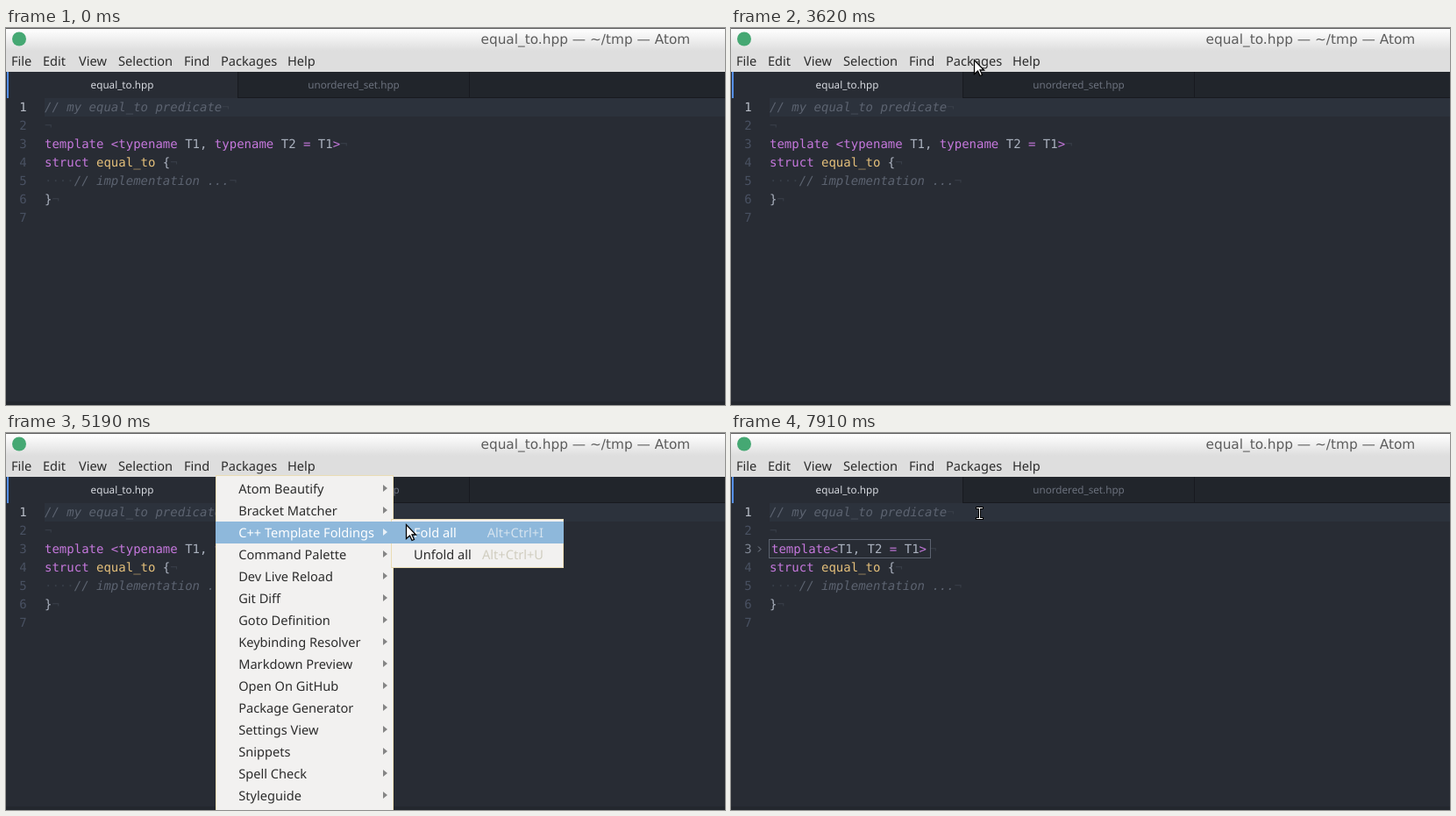
An HTML page with a canvas that plays this animation: 820x430 px, repeating every 8 s.

```html
<!DOCTYPE html>
<html lang="en">
<head>
<meta charset="utf-8">
<title>Template folding</title>
<style>
  html, body { margin: 0; width: 100%; height: 100%; overflow: hidden; background: #282c34; }
  canvas { display: block; }
</style>
</head>
<body>
<canvas id="stage" width="820" height="430"></canvas>
<script>
const ctx = document.getElementById('stage').getContext('2d');
ctx.textRendering = 'geometricPrecision';

const LOOP = 8000;
const UI = '14.6px "Noto Sans", "Open Sans", sans-serif';
const TAB = '11.7px "Noto Sans", "Open Sans", sans-serif';
const TITLE = '15.33px "DejaVu Sans", sans-serif';
const CODE = '14px "DejaVu Sans Mono", monospace';
const CHAR = 8.428, CODE_X = 44, ROW = 21;

const PURPLE = '#c678dd', PLAIN = '#abb2bf', YELLOW = '#e5c07b';
const COMMENT = '#5c6370', FAINT = '#383e48', BLUE = '#5691e8';
const MENU_BG = '#f2f1f0', MENU_HOVER = '#8eb8db', MENU_TEXT = '#2c2c2c', MENU_EDGE = '#eadcb4';

const menuBar = [['File', 6], ['Edit', 42], ['View', 83], ['Selection', 128],
  ['Find', 203], ['Packages', 245], ['Help', 321]];
const packages = ['Atom Beautify', 'Bracket Matcher', 'C++ Template Foldings', 'Command Palette',
  'Dev Live Reload', 'Git Diff', 'Goto Definition', 'Keybinding Resolver', 'Markdown Preview',
  'Open On GitHub', 'Package Generator', 'Settings View', 'Snippets', 'Spell Check', 'Styleguide'];
const actions = [['Fold all', 'Alt+Ctrl+I'], ['Unfold all', 'Alt+Ctrl+U']];

const header = [['template <typename', PURPLE], [' T1, ', PLAIN], ['typename', PURPLE],
  [' T2 ', PLAIN], ['=', PURPLE], [' T1', PLAIN], ['>', PURPLE]];
const foldedHeader = [['template<', PURPLE], ['T1, T2 ', PLAIN], ['=', PURPLE],
  [' T1', PLAIN], ['>', PURPLE]];
const EOL = ['¬', FAINT];

const MENU_OPEN = 3750, SUBMENU_OPEN = 4650, MENU_CLOSE = 5850, FOLD = 5890;
const blinks = [80, 480, 880, 1280, 1680, 2070, 2460, 2860, 3260, 3620, 5850, 6330, 6730, 7120, 7520, 7910];

// Pointer path: time, x, y
const path = [[3020, 505, 78], [3140, 360, 52], [3260, 277, 36], [3970, 277, 36], [4130, 288, 75],
  [4250, 297, 97], [4370, 302, 107], [4830, 302, 107], [5010, 400, 108], [5190, 463, 104],
  [5930, 463, 104], [6250, 368, 98], [6620, 284, 91], [6660, 283, 91]];

function rect(x, y, w, h, color) {
  ctx.fillStyle = color;
  ctx.fillRect(x, y, w, h);
}

function text(str, x, y, font, color, align = 'left') {
  ctx.font = font;
  ctx.fillStyle = color;
  ctx.textAlign = align;
  ctx.fillText(str, x, y);
}

function polygon(points, fill, stroke) {
  ctx.beginPath();
  points.forEach(([x, y]) => ctx.lineTo(x, y));
  ctx.closePath();
  ctx.fillStyle = fill;
  ctx.fill();
  if (stroke) {
    ctx.strokeStyle = stroke;
    ctx.lineWidth = 1.3;
    ctx.stroke();
  }
}

function code(line, segments, x = CODE_X) {
  for (const [str, color] of segments) {
    const font = color === COMMENT ? 'italic ' + CODE : CODE;
    text(str, x, 74 + line * ROW, font, color);
    x += str.length * CHAR;
  }
}

function drawWindow() {
  const shade = ctx.createLinearGradient(0, 1, 0, 26);
  shade.addColorStop(0, '#ffffff');
  shade.addColorStop(1, '#dedede');
  rect(0, 0, 820, 50, '#dedede');
  rect(0, 1, 820, 25, shade);
  rect(0, 0, 820, 1, '#5c5c5c');
  ctx.beginPath();
  ctx.arc(15, 12.5, 8, 0, 2 * Math.PI);
  ctx.fillStyle = '#45a873';
  ctx.fill();
  text('equal_to.hpp — ~/tmp — Atom', 541.5, 18, TITLE, '#5c5c5c');
  for (const [label, x] of menuBar) text(label, x, 43, UI, MENU_TEXT);

  rect(0, 50, 820, 30, '#21252b');
  rect(264, 79, 556, 1, '#181a1f');
  rect(0, 50, 264, 30, '#282c34');
  rect(264, 50, 1, 30, '#181a1f');
  rect(528, 50, 1, 30, '#181a1f');
  rect(1, 50, 2, 30, BLUE);
  text('equal_to.hpp', 132.5, 69, TAB, '#d7dae0', 'center');
  text('unordered_set.hpp', 396.5, 69, TAB, '#6b717d', 'center');
}

function drawEditor(t) {
  const folded = t >= FOLD;
  rect(0, 80, 820, 350, '#282c34');
  rect(44, 80, 776, ROW, '#2c323c');
  rect(0, 426, 820, 4, '#23272e');
  for (let n = 1; n <= 7; n++) {
    const color = n === 1 ? '#b9bec8' : n === 3 && folded ? '#7f8694' : '#495162';
    text(n, 15.3, 74 + n * ROW, CODE, color);
  }
  code(1, [['// my equal_to predicate', COMMENT], EOL]);
  code(2, [EOL]);
  if (folded) {
    code(3, foldedHeader, 46);
    code(3, [EOL], 226);
    ctx.strokeStyle = '#5c6370';
    ctx.lineWidth = 1;
    ctx.strokeRect(43.5, 121.5, 184, 21);
    ctx.strokeStyle = '#7f8694';
    ctx.beginPath();
    ctx.moveTo(31, 129.5);
    ctx.lineTo(34, 132.5);
    ctx.lineTo(31, 135.5);
    ctx.stroke();
  } else {
    code(3, [...header, EOL]);
  }
  code(4, [['struct ', PURPLE], ['equal_to', YELLOW], [' {', PLAIN], EOL]);
  code(5, [['····', FAINT], ['// implementation ...', COMMENT], EOL]);
  code(6, [['}', PLAIN], EOL]);

  const caretOn = blinks.filter(b => b <= t).length % 2 === 1;
  if (caretOn) rect(246, 80, 2, ROW, BLUE);
}

function panel(x, y, w, h) {
  rect(x, y, w, h, MENU_EDGE);
  rect(x + 1, y + 1, w - 2, h - 2, MENU_BG);
}

function drawMenus(t, pointer) {
  if (t < MENU_OPEN || t >= MENU_CLOSE) return;
  const hovered = Math.min(2, Math.floor((pointer.y - 51) / 25));
  panel(239, 48, 203, 390);
  packages.forEach((label, i) => {
    const y = 51 + i * 25, active = i === hovered;
    if (active) rect(239, y, 203, 25, MENU_HOVER);
    text(label, 265.2, y + 18, UI, active ? '#ffffff' : MENU_TEXT);
    polygon([[430, y + 8], [435, y + 12], [430, y + 16]], active ? '#e8f0f7' : '#858585');
  });

  if (t < SUBMENU_OPEN) return;
  panel(439, 98, 197, 56);
  actions.forEach(([label, keys], i) => {
    const y = 101 + i * 25, active = i === 0 && pointer.x >= 440;
    if (active) rect(439, y, 197, 25, MENU_HOVER);
    text(label, 465, y + 18, UI, active ? '#ffffff' : MENU_TEXT);
    text(keys, 613, y + 18, UI, active ? '#d5e3ef' : '#d0cdbf', 'right');
  });
}

function pointerAt(t) {
  const tick = Math.floor((t - 10) / 40) * 40 + 10;
  const time = Math.max(tick, path[0][0]);
  const next = path.findIndex(p => p[0] > time);
  if (next < 0) {
    const [, x, y] = path[path.length - 1];
    return { x, y };
  }
  const [t0, x0, y0] = path[next - 1], [t1, x1, y1] = path[next];
  const k = (time - t0) / (t1 - t0);
  return { x: Math.round(x0 + (x1 - x0) * k), y: Math.round(y0 + (y1 - y0) * k) };
}

function drawPointer(t, { x, y }) {
  if (t < path[0][0]) return;
  if (t < 5970) {
    const arrow = [[0, 0], [0, 16], [4, 12.5], [6.5, 18], [9, 17], [6.5, 11.5], [11, 11.5]];
    polygon(arrow.map(([dx, dy]) => [x + dx + .5, y + dy + .5]), '#ffffff', '#000000');
    return;
  }
  for (const [pad, color] of [[1, '#000000'], [0, '#ffffff']]) {
    for (const [dx, dy, w, h] of [[-3, -6, 7, 1], [0, -6, 1, 13], [-3, 6, 7, 1]]) {
      rect(x + dx - pad, y + dy - pad, w + 2 * pad, h + 2 * pad, color);
    }
  }
}

const start = performance.now();

function frame() {
  const t = (performance.now() - start) % LOOP;
  const pointer = pointerAt(t);
  drawWindow();
  drawEditor(t);
  drawMenus(t, pointer);
  drawPointer(t, pointer);
  requestAnimationFrame(frame);
}
frame();
</script>
</body>
</html>
```
